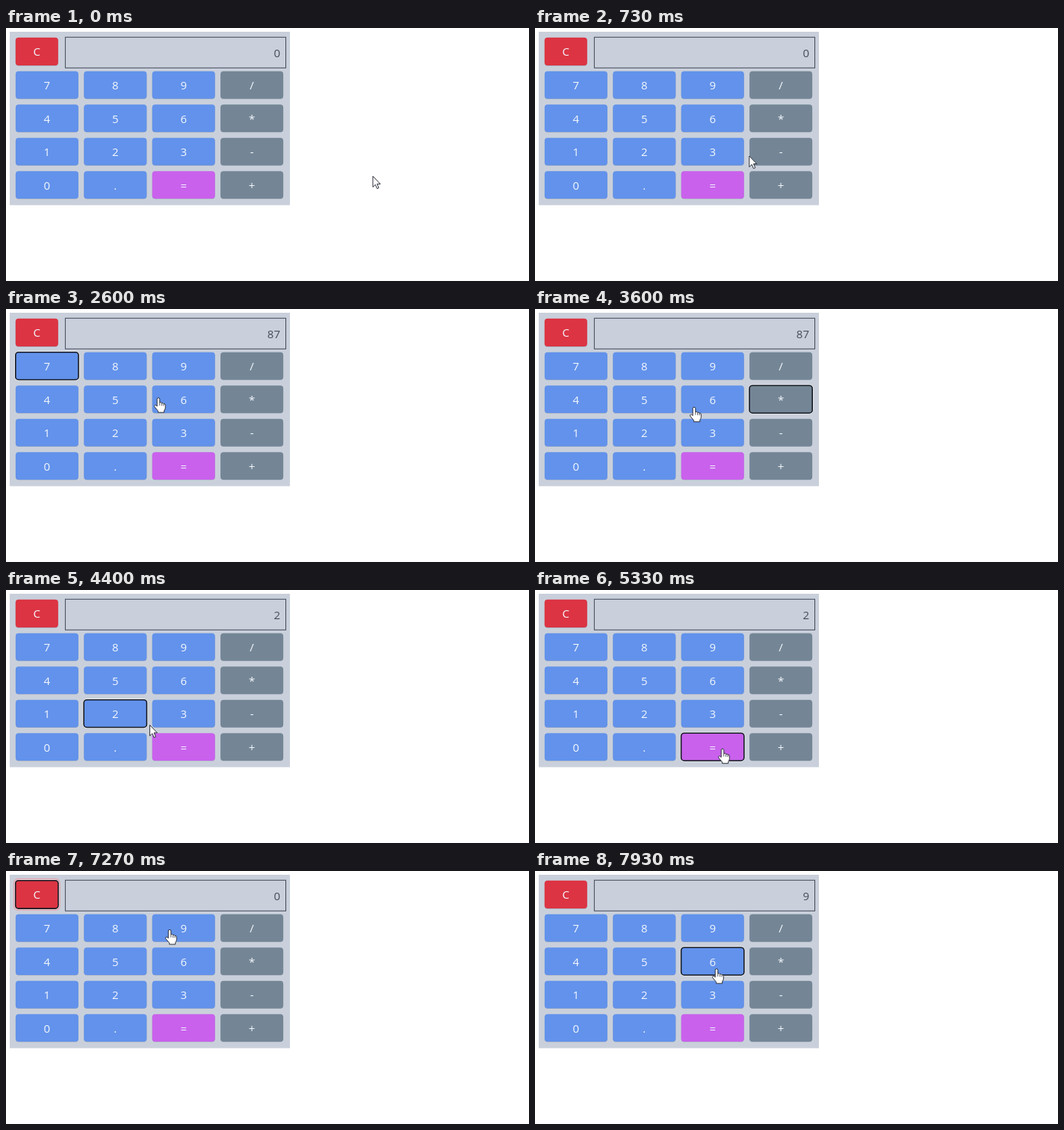
An HTML page with a canvas that plays this animation: 700x338 px, repeating every 8000 ms.

```html
<!DOCTYPE html>
<html lang="en">
<head>
<meta charset="utf-8">
<title>Calculator</title>
<style>
html, body { margin: 0; width: 100%; height: 100%; overflow: hidden; background: #fff; }
canvas { display: block; width: 700px; height: 338px; }
</style>
</head>
<body>
<canvas id="stage"></canvas>
<script>
const LOOP = 8000, STEP = 1000 / 15, DWELL = 80, RELEASE = 70;
const canvas = document.getElementById('stage');
const ctx = canvas.getContext('2d');
const dpr = window.devicePixelRatio || 1;
canvas.width = 700 * dpr;
canvas.height = 338 * dpr;

const BLUE = '#6292eb', GREY = '#748696', PURPLE = '#c961ec', RED = '#dc3443', DARK_RED = '#bd2130';

const buttons = [{ label: 'C', x: 12.8, y: 12.8, w: 57, h: 37.2, color: RED }];
['789/', '456*', '123-', '0.=+'].forEach((row, r) => {
  [...row].forEach((label, c) => {
    const color = label === '=' ? PURPLE : c === 3 ? GREY : BLUE;
    buttons.push({ label, x: 12.9 + 91.4 * c, y: 57.8 + 44.5 * r, w: 84, h: 36.6, color });
  });
});

// Pointer stops; those with a key press it
const stops = [
  { t: 0, x: 491, y: 198 },
  { t: 1330, x: 137, y: 120 },
  { t: 1530, x: 147, y: 80, key: '8' },
  { t: 2060, x: 62, y: 80, key: '7' },
  { t: 2600, x: 204, y: 119 },
  { t: 3000, x: 325, y: 122, key: '*' },
  { t: 3600, x: 213, y: 131.5 },
  { t: 4070, x: 177, y: 172, key: '2' },
  { t: 5000, x: 251, y: 212.5 },
  { t: 5330, x: 251, y: 212.5, key: '=' },
  { t: 6530, x: 43, y: 27, key: 'C' },
  { t: 7460, x: 230, y: 82, key: '9' },
  { t: 7930, x: 243, y: 131, key: '6' }
];
const presses = stops.filter(s => s.key);

// The pointer rests briefly around each press
const path = stops.flatMap(s => s.key
  ? [{ ...s, t: s.t - DWELL }, { ...s, t: s.t + DWELL }] : [s]);

// Tangent that never overshoots a stop
function slope(i, k) {
  const a = path[i - 1], b = path[i], c = path[i + 1];
  if (!a || !c) return 0;
  const s = (b[k] - a[k]) / (b.t - a.t);
  const e = (c[k] - b[k]) / (c.t - b.t);
  return s * e <= 0 ? 0 : 2 * s * e / (s + e);
}

function pointer(t) {
  let i = 0;
  while (i < path.length - 2 && path[i + 1].t <= t) i++;
  const a = path[i], b = path[i + 1], d = b.t - a.t, u = (t - a.t) / d;
  return ['x', 'y'].map(k => a[k] + (b[k] - a[k]) * u * u * (3 - 2 * u)
    + d * u * (1 - u) * ((1 - u) * slope(i, k) - u * slope(i + 1, k)));
}

function display(t) {
  let shown = '0', held = 0, fresh = true;
  for (const { t: time, key } of presses) {
    if (time + RELEASE > t) break;
    if (key === 'C') shown = '0';
    else if (key === '*') held = +shown;
    else if (key === '=') shown = String(held * shown);
    else shown = fresh ? key : shown + key;
    fresh = !/\d/.test(key);
  }
  return shown;
}

function box(x, y, w, h, r) {
  ctx.beginPath();
  ctx.roundRect(x, y, w, h, r);
}

function text(str, x, y, color, align) {
  ctx.font = '15px "Open Sans", "Noto Sans", sans-serif';
  ctx.textAlign = align;
  ctx.fillStyle = color;
  ctx.fillText(str, x, y);
}

function ring(b, grow, width, color) {
  box(b.x - grow, b.y - grow, b.w + 2 * grow, b.h + 2 * grow, 4 + grow);
  ctx.lineWidth = width;
  ctx.strokeStyle = color;
  ctx.stroke();
}

function drawButton(b, focused, hovered) {
  ctx.fillStyle = 'rgba(70,80,110,.3)';
  box(b.x, b.y + .7, b.w, b.h, 4);
  ctx.fill();
  ctx.fillStyle = hovered && b.color === RED ? DARK_RED : b.color;
  box(b.x, b.y, b.w, b.h, 4);
  ctx.fill();
  if (focused) {
    if (b.color === RED) ring(b, 1.5, 3, 'rgba(232,150,160,.75)');
    ring(b, 1.2, 1, 'rgba(244,245,248,.8)');
    ring(b, .1, 1.6, '#161922');
  }
  text(b.label, b.x + b.w / 2, b.y + b.h / 2 + 6, '#f4f7fd', 'center');
}

const arrow = new Path2D('M0 0V14.5L3.4 11.3L5.7 16.6L8 15.6L5.7 10.4H10Z');
const hand = new Path2D('M-1.8 1.2Q-1.6 -.3 0 -.3Q1.6 -.3 1.8 1.2V6' +
  'Q3.8 5.2 4.6 6.7Q6.3 6.1 7 7.6Q9.2 7.2 9.3 9.4V13Q9.2 15 7.7 16.7V19.2H-.4V17.4' +
  'L-5.2 11.6Q-5.9 10 -4.6 9.4Q-3.4 9.1 -1.8 11Z');
const knuckles = new Path2D('M1.8 6V10M4.6 6.7V10.3M7 7.6V10.6');

function drawPointer(x, y, over) {
  const shape = over ? hand : arrow;
  ctx.save();
  ctx.translate(x, y);
  ctx.lineJoin = 'round';
  ctx.lineWidth = 1;
  ctx.fillStyle = '#fff';
  ctx.strokeStyle = '#2a2e38';
  ctx.fill(shape);
  ctx.stroke(shape);
  if (over) {
    ctx.lineWidth = .8;
    ctx.stroke(knuckles);
  }
  ctx.restore();
}

function draw(t) {
  ctx.setTransform(dpr, 0, 0, dpr, 0, 0);
  ctx.fillStyle = '#fff';
  ctx.fillRect(0, 0, 700, 338);
  ctx.fillStyle = '#fafafa';
  ctx.fillRect(0, 337, 700, 1);
  ctx.fillStyle = '#c9d0db';
  ctx.fillRect(5, 5, 375, 231.7);

  ctx.lineWidth = 1;
  ctx.strokeStyle = '#414857';
  ctx.strokeRect(79.4, 12.3, 295.1, 41);
  text(display(t), 367, 39.4, '#454c5a', 'right');

  const [x, y] = pointer(t);
  const over = buttons.find(b => x >= b.x && x <= b.x + b.w && y >= b.y && y <= b.y + b.h);
  const last = presses.filter(p => p.t <= t).pop();
  for (const b of buttons) drawButton(b, last && last.key === b.label, b === over);
  drawPointer(x, y, over);
}

function tick(now) {
  const frame = Math.floor((now % LOOP + 5) / STEP);
  draw(frame * STEP % LOOP);
  requestAnimationFrame(tick);
}
requestAnimationFrame(tick);
</script>
</body>
</html>
```
